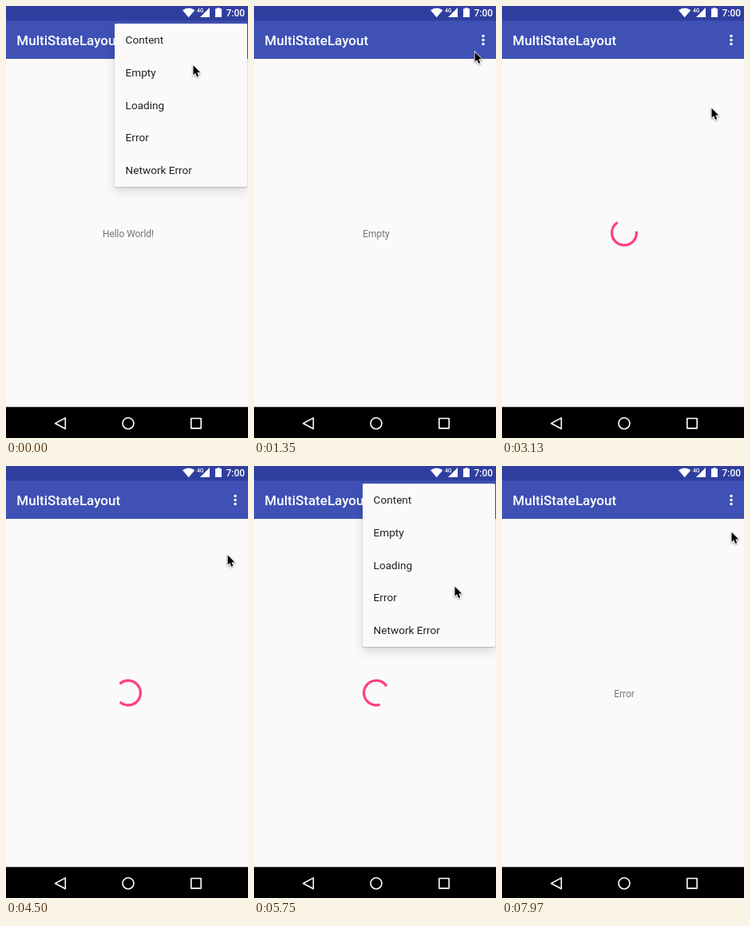
An HTML page for the animation above (7990 ms loop, 303 px wide and 540 px high).

```html
<!DOCTYPE html>
<html lang="en">
<head>
<meta charset="utf-8">
<title>MultiStateLayout</title>
<style>
  html, body { margin: 0; width: 100%; height: 100%; overflow: hidden; background: #fafafa; }
  body { position: relative; font-family: Roboto, sans-serif; }
  svg { position: absolute; left: 0; top: 0; }
  .medium { font-weight: 500; fill: #fff; }
  #menu { position: absolute; left: 136px; top: 22px; width: 166px; height: 204px; border-radius: 1.7px; background: #fafafa;
          box-shadow: 0 1px 2px rgba(0, 0, 0, .2), 0 6px 14px rgba(0, 0, 0, .13); }
  #menu div { height: 40.8px; padding-left: 13.6px; font-size: 13.6px; line-height: 41.2px; color: #212121; }
</style>
</head>
<body>
<svg width="303" height="540">
  <path fill="#3f51b5" d="M0 0H303V66H0Z"/>
  <path fill="#303f9f" d="M0 0H303V18.500H0Z"/>
  <path fill="#000" opacity=".06" d="M0 66H303V67H0Z"/>
  <g fill="#fff">
    <path d="M221 5.200Q228.700 -.4 236.400 5.200L228.700 14.300Z"/>
    <path d="M255 2V14H243Z"/>
    <path d="M264.500 2H267.500V3.200H270V14H262V3.200H264.500Z"/>
    <circle cx="287" cy="37.400" r="1.750"/>
    <circle cx="287" cy="42.500" r="1.750"/>
    <circle cx="287" cy="47.600" r="1.750"/>
  </g>
  <text class="medium" x="239" y="7.500" font-size="6.800">4G</text>
  <text class="medium" x="275.500" y="13" font-size="11.900">7:00</text>
  <text class="medium" x="13.300" y="49" font-size="17">MultiStateLayout</text>
  <text id="message" x="153" y="288.700" font-size="11.900" text-anchor="middle" fill="#737373"></text>
  <circle id="arc" cx="153" cy="283.600" r="15.400" pathLength="360" fill="none" stroke="#ff4081" stroke-width="3.250" stroke-linecap="square"/>
  <path d="M0 501.300H303V540H0Z"/>
  <g fill="none" stroke="#fff" stroke-width="1.600" stroke-linejoin="round">
    <path d="M74.300 514.900V528.500L61.600 521.700Z"/>
    <circle cx="153" cy="521.700" r="7"/>
    <path d="M231.800 515.500H244.200V527.900H231.800Z"/>
  </g>
</svg>
<div id="menu"></div>
<svg width="303" height="540">
  <path id="cursor" d="M.5 .8V12.800L3.200 10.300 5.200 15 7.200 14.100 5.300 9.500H9.200Z" stroke="#fff" stroke-width="1.600" paint-order="stroke"
        style="filter: drop-shadow(0 1px 1px rgba(0, 0, 0, .4))"/>
</svg>
<script>
const LOOP = 7990, MOVE = 300, SPIN_START = 2755, SPIN_END = 6650;
const $ = id => document.getElementById(id);
const menu = $('menu'), message = $('message'), arc = $('arc'), cursor = $('cursor');
const clamp = v => Math.min(1, Math.max(0, v));
const easeOut = (p, power) => 1 - (1 - p) ** power;

const items = ['Content', 'Empty', 'Loading', 'Error', 'Network Error'].map(label => {
  const item = document.createElement('div');
  item.textContent = label;
  menu.append(item);
  return item;
});

// Each visit to the menu: when it opens, when an item is tapped, and which one.
const visits = [
  { open: -500, tap: 550, item: 1 },
  { open: 1870, tap: 2750, item: 2 },
  { open: 5200, tap: 6640, item: 3 }
];

// Pointer moves: start time and destination.
const moves = [
  [50, 205, 76], [1200, 286, 38], [1880, 247, 132], [2830, 262, 127], [4200, 277, 111],
  [4500, 288, 38], [5450, 251, 150], [5800, 272, 171], [7440, 284, 117], [7670, 287, 82]
];

// The pointer swings sideways quickly, while its height changes evenly.
function pointer(t) {
  let x = 234, y = 73.5;
  for (const [start, toX, toY] of moves) {
    const p = clamp((t - start) / MOVE);
    x += (toX - x) * easeOut(p, 3);
    y += (toY - y) * p;
  }
  return [x, y];
}

// Cubic with control points (.2, 0), (.1, 1) that ends at x = .5.
function sweep(x) {
  if (x <= 0 || x >= .5) return x > 0 ? 1 : 0;
  let low = 0, high = 1;
  for (let i = 0; i < 20; i++) {
    const s = (low + high) / 2, r = 1 - s;
    if (.6 * r * r * s + .3 * r * s * s + .5 * s ** 3 < x) low = s; else high = s;
  }
  return low * low * (3 - 2 * low);
}

function drawSpinner(t) {
  const clock = (t - SPIN_START) * 1.03, p = clock / 1333 % 1;
  const start = 270 * sweep(p - .5), end = 270 * sweep(p);
  const angle = clock * 720 / 4444 + 90 * p + start - 90;
  arc.setAttribute('transform', `rotate(${angle} 153 283.6)`);
  arc.setAttribute('stroke-dasharray', `${Math.max(.1, end - start)} 360`);
}

function drawMenu(t, visit, x, y) {
  const p = clamp((t - visit.open) / 250), since = t - visit.tap;
  menu.style.opacity = clamp((t - visit.open) / 100) * (1 - clamp((since - 190) / 100));
  // The margin of 30 leaves room for the shadow.
  menu.style.clipPath = `inset(-30px -30px ${204 - 234 * easeOut(p, 1.6)}px ${166 - 196 * easeOut(p, 2.3)}px)`;
  items.forEach((item, i) => {
    const radius = 170 * clamp(since / 250);
    item.style.background = i === visit.item && since > 0
      ? `radial-gradient(circle at ${x - 136}px ${y - 22 - 40.8 * i}px, rgba(0,0,0,.07) ${radius}px, transparent ${radius + 1}px)`
      : 'none';
  });
}

function draw(t) {
  const [x, y] = pointer(t);
  cursor.setAttribute('transform', `translate(${x} ${y})`);
  const loading = t >= SPIN_START && t < SPIN_END;
  message.textContent = loading ? '' : t < 560 ? 'Hello World!' : t < SPIN_START ? 'Empty' : 'Error';
  arc.style.display = loading ? '' : 'none';
  if (loading) drawSpinner(t);
  drawMenu(t, visits.findLast(v => t >= v.open), x, y);
}

const begin = performance.now();
function frame() {
  draw((performance.now() - begin) % LOOP);
  requestAnimationFrame(frame);
}
frame();
</script>
</body>
</html>
```
